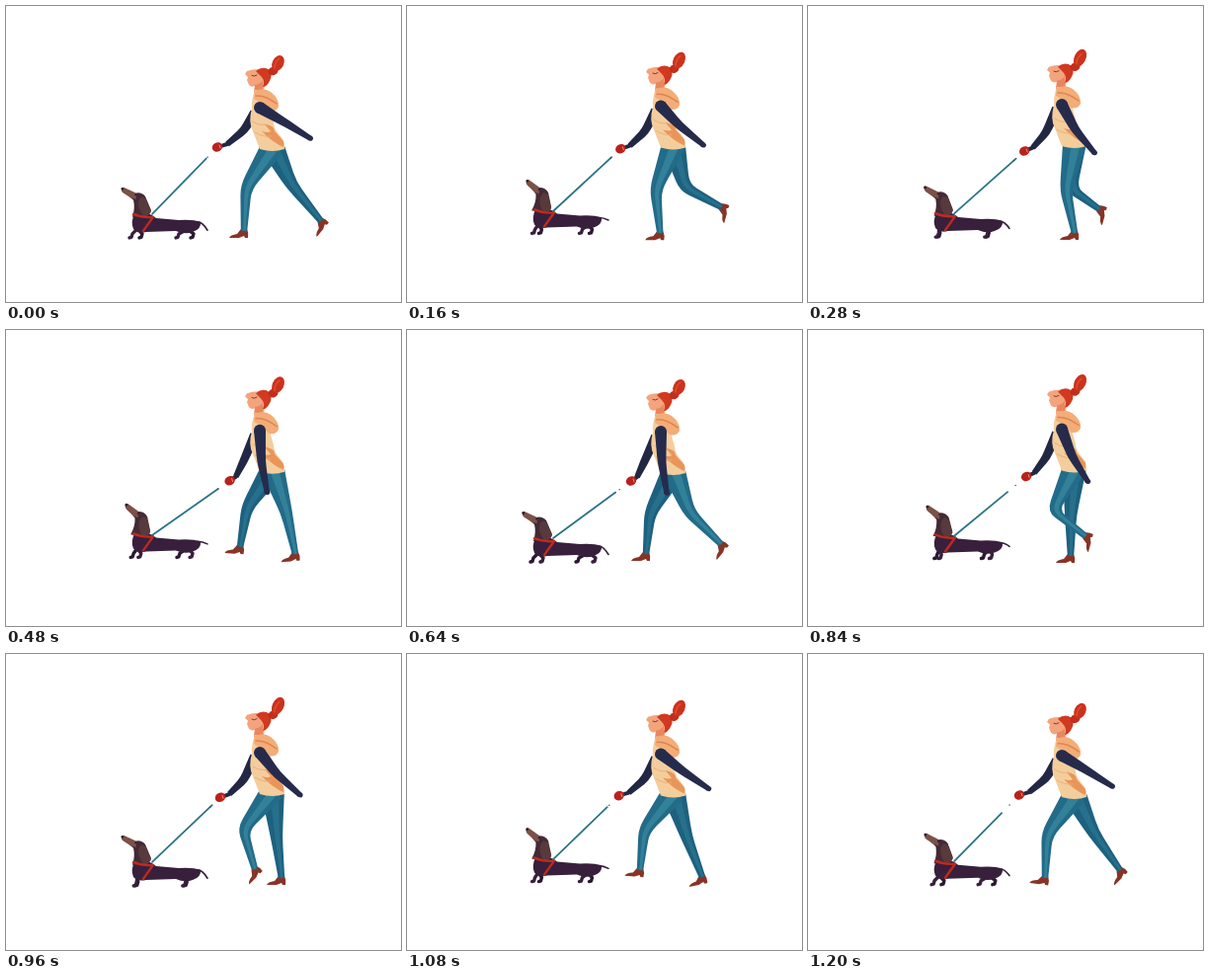
Write an HTML page with a canvas that moves like this. It is 400 px wide and 300 px high and loops after 1240 ms.

```html
<!DOCTYPE html>
<html lang="en">
<head>
<meta charset="utf-8">
<title>Dog walk</title>
<style>
  html, body { margin: 0; width: 100%; height: 100%; overflow: hidden; background: #fff; }
  canvas { display: block; width: 400px; height: 300px; }
</style>
</head>
<body>
<canvas id="stage" width="400" height="300"></canvas>
<script>
const ctx = document.getElementById('stage').getContext('2d');
const LOOP = 1240, STEP = 40, TAU = Math.PI * 2;
const NAVY = '#262b4c', RED = '#bf2a20', DOG = '#38203c';

// Walk poses at these times; the curves between them are smooth and cyclic.
const times = [0, 120, 280, 480, 640, 840, 960, 1080, 1200];
const nearLeg = {
  kneeX: [243, 249, 261, 284, 286, 248, 240, 240, 242],
  kneeY: [184, 186, 187, 185, 185, 183, 178, 179, 183],
  ankleX: [241, 252, 270, 293, 318, 281, 252, 236, 240],
  ankleY: [228, 230, 230, 227, 217, 209, 218, 219, 227],
  tilt: [0, 0, 0, -5, -50, -75, -45, 5, 7]
};
const farLeg = {
  kneeX: [289, 285, 267, 244, 246, 266, 274, 283, 289],
  kneeY: [181, 183, 186, 180, 186, 188, 186, 185, 181],
  ankleX: [319, 323, 295, 237, 242, 266, 279, 299, 316],
  ankleY: [218, 205, 206, 220, 227, 229, 227, 226, 219],
  tilt: [-50, -70, -75, 4, 0, 0, 0, -12, -45]
};
const armSwing = [1, 0.88, 0.6, 0.03, 0, 0.45, 0.77, 0.94, 1];
const leashReach = [0.83, 0.86, 0.88, 0.85, 0.8, 0.74, 0.88, 0.82, 0.73];

function curve(values, t) {
  const n = times.length;
  const time = i => times[(i + n) % n] + LOOP * Math.floor(i / n);
  const value = i => values[(i + n) % n];
  const slope = i => (value(i + 1) - value(i - 1)) / (time(i + 1) - time(i - 1));
  let i = n - 1;
  while (times[i] > t) i--;
  const span = time(i + 1) - time(i), u = (t - time(i)) / span, v = 1 - u;
  return value(i) * v * v * (1 + 2 * u) + value(i + 1) * u * u * (3 - 2 * u)
    + span * u * v * (slope(i) * v - slope(i + 1) * u);
}

const mix = (a, b, u) => a.map((v, i) => v + (b[i] - v) * u);

function shape(d, color) {
  ctx.fillStyle = color;
  ctx.fill(new Path2D(d));
}

function line(d, color, width) {
  ctx.strokeStyle = color;
  ctx.lineWidth = width;
  ctx.stroke(new Path2D(d));
}

function oval(x, y, rx, ry, angle, color) {
  ctx.fillStyle = color;
  ctx.beginPath();
  ctx.ellipse(x, y, rx, ry, angle, 0, TAU);
  ctx.fill();
}

// Tapered limb through three joints; from and to are its edges as shares of the half width.
function limb(joints, widths, color, from = -1, to = 1) {
  const edge = side => joints.map(([x, y], i) => {
    const a = joints[Math.max(i - 1, 0)], b = joints[Math.min(i + 1, 2)];
    const dx = b[0] - a[0], dy = b[1] - a[1], k = widths[i] * side / Math.hypot(dx, dy);
    return [x + dy * k, y - dx * k];
  });
  const smooth = ([a, b, c]) => {
    const near = mix(b, a, 0.22), far = mix(b, c, 0.22);
    return `${a} L${near} Q${b} ${far} L${c}`;
  };
  shape(`M${smooth(edge(from))} L${smooth(edge(to).reverse())}Z`, color);
}

function leg(pose, t, bob, base, light) {
  const at = key => curve(pose[key], t);
  const ankle = [at('ankleX'), at('ankleY')];
  const joints = [[270, 143 + bob], [at('kneeX'), at('kneeY')], ankle];
  ctx.save();
  ctx.translate(...ankle);
  ctx.rotate(at('tilt') * Math.PI / 180);
  shape('M-3-2L3-2Q5 2 4 7L1 7L0 5L-5 7L-15 7Q-14 4-7 3Z', '#873426');
  ctx.restore();
  limb(joints, [12, 6, 3.2], base);
  limb(joints, [12, 6, 3.2], light, -0.25, 0.5);
}

function drawDog(t, wave) {
  const swing = Math.cos(TAU * t / LOOP), lift = wave - 1;
  ctx.save();
  ctx.translate(0, 2.3 * lift);
  for (const [x, reach, color] of [[132, -5, '#2b1931'], [181, -8, '#2b1931'], [132, 5, DOG], [182, 8, DOG]]) {
    const foot = x - reach * swing;
    line(`M${x + (x > 150 ? 2 : 1)} 226L${foot + 1} 231L${foot} 234.5L${foot - 2} 235`, color, 3.4);
  }
  line(`M194 219Q199 219 204 ${227.5 + 3 * lift}`, DOG, 1.6);
  shape('M130 211Q126 219 129 226Q133 231 142 229L172 228Q181 232 189 229Q198 226 197 219Q189 216 175 217L152 215Q146 210 140 210Z', DOG);
  ctx.save();
  ctx.translate(138, 204);
  ctx.rotate(-0.1 * lift);
  ctx.translate(-138, -204);
  shape('M130 190Q137 188 141 193L147 207L143 214L128 214Q131 205 129 197L122 191Z', '#432a36');
  shape('M117 184.5L119 184L131 189.5L132 196L127 195L119 190Q116 188 117 184.5Z', '#7b5148');
  shape('M136 194Q141 193 143 199L147 208Q145 214 139 213Q133 205 134 198Z', '#58393c');
  oval(117.8, 185.5, 1.4, 1.4, 0, '#2b1931');
  oval(131, 191.5, 0.8, 0.8, 0, '#1d1220');
  ctx.restore();
  line('M129 211Q138 215 149 214L139 228', RED, 2.4);
  ctx.restore();
}

function drawHead(bob) {
  ctx.save();
  ctx.translate(0, bob);
  shape('M256 64Q249 64 244 66L242 69L245 72L244 75L246 80Q249 83 252 81L251 90L261 90L262 66Z', '#f4a47c');
  shape('M252 80Q258 79 260 75L260 90L251 90Z', '#e8875f');
  line('M249 70.5Q251 72 254 70', '#6b3030', 0.9);
  shape('M253 66Q260 60 267 65Q270 71 267 76Q264 82 260 82Q263 76 258 71Z', '#d13a20');
  oval(270.5, 66, 5, 4.2, -0.3, '#c22d1c');
  oval(275.5, 58 + bob * 0.25, 5.8, 8.3 - bob * 0.25, 0.45, '#cb321d');
  line('M272 63Q272 57 277 53', '#dd4c2b', 1.5);
  ctx.restore();
}

function drawVest(bob) {
  ctx.save();
  ctx.translate(0, bob * 0.7);
  shape('M252 85Q248 96 249 104Q245 117 250 127L257 145Q270 149 282 145Q283 138 278 132Q271 125 271 118L267 104L262 86Z', '#f4cd9d');
  shape('M262 120Q272 121 272 127L281 137L281 143Q271 139 259 127Q266 129 268 127Z', '#e99559');
  line('M250 117Q257 122 264 120M252 128Q260 133 268 132', '#e6ae78', 0.9);
  shape('M252 86Q261 82 268 87Q277 94 276 102Q273 108 266 106Q257 97 251 94Z', '#f3ad78');
  line('M253 91Q262 90 274 99', '#df8550', 1.5);
  ctx.restore();
}

function draw(t) {
  const bob = 2.2 * (Math.cos(2 * TAU * t / LOOP) - 1);
  const wave = Math.cos(4 * TAU * (t - 15) / LOOP);
  const swing = curve(armSwing, t), sag = 9 * swing * (1 - swing);
  const grip = mix([227, 153], [214, 143], swing);
  const wrist = mix([233, 149], [224, 140], swing);
  const elbow = mix([241, 132], [241, 126], swing);
  const nearElbow = mix([258, 134], [279, 116], swing);
  const nearHand = mix([263, 165], [308, 134], swing);
  nearElbow[1] += sag;
  nearHand[1] += sag;

  ctx.fillStyle = '#fff';
  ctx.fillRect(0, 0, 400, 300);
  ctx.lineCap = ctx.lineJoin = 'round';

  drawDog(t, wave);
  const collar = [148, 211 + 1.5 * (wave - 1)];
  line(`M${collar}L${mix(collar, grip, curve(leashReach, t))}`, '#2b7487', 1.8);
  oval(...mix(collar, grip, 0.85), 0.7, 0.7, 0, '#2b4a58');

  limb([[252, 108 + bob], elbow, wrist], [5, 4.2, 2.8], '#222744');
  line(`M${wrist}L${mix(wrist, grip, 0.45)}`, '#222744', 4);
  oval(...grip, 5.4, 4.6, -0.5, '#b9221c');
  line(`M${grip[0] + 2} ${grip[1] - 2}l1 3`, '#ef9a77', 0.9);

  leg(farLeg, t, bob, '#1d617f', '#27708c');
  leg(nearLeg, t, bob, '#226b89', '#338199');
  drawHead(bob);
  drawVest(bob);

  const shoulder = [257, 103 + bob * 0.7];
  oval(...shoulder, 6, 6, 0, NAVY);
  limb([shoulder, nearElbow, nearHand], [6, 4.3, 2.6], NAVY);
  oval(...nearHand, 3, 2.6, 0.4, NAVY);
}

function tick(now) {
  draw(Math.floor((now % LOOP) / STEP) * STEP);
  requestAnimationFrame(tick);
}
requestAnimationFrame(tick);
</script>
</body>
</html>
```
